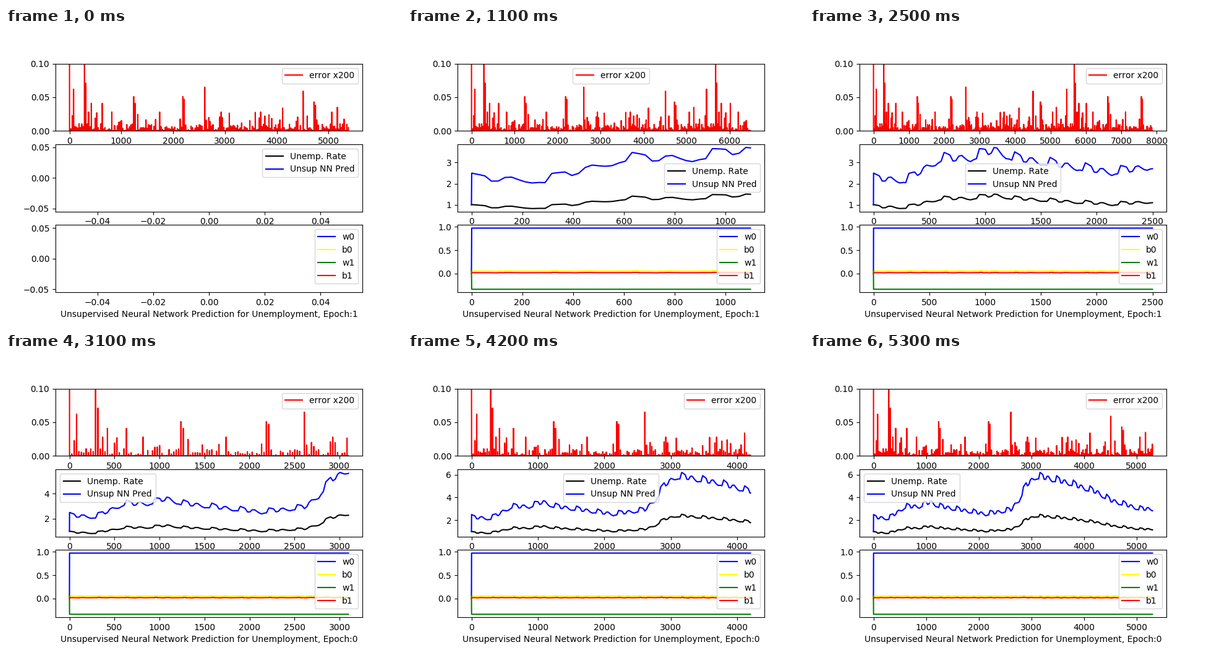
Write a matplotlib script that moves like this. It is 640 px wide and 480 px high and loops after 5.4 s.

```python
import numpy as np
import matplotlib.pyplot as plt
from matplotlib.animation import FuncAnimation

plt.rcParams["font.family"] = "DejaVu Sans"
plt.rcParams["text.kerning_factor"] = 6

FRAMES = 54
STEP = 100          # samples added per frame
TOTAL = 5382        # samples in one epoch
MONTH = 26.36       # samples per month
SWITCH = 28         # frames from here on show epoch 0
GAIN = 2.455        # prediction relative to the rate

# Key points (month, level) of the relative rate, and its yearly swing
TREND = [(0, .92), (11, .88), (23, 1.3), (33, 1.31), (41, 1.47), (47, 1.32),
         (81, 1.035), (99, 1.19), (105, 1.55), (110, 2.07), (117, 2.37),
         (123, 2.35), (141, 2.15), (161, 1.82), (171, 1.53), (192, 1.22)]
SEASON = np.array([1, .8, .55, -.45, -.4, .35, .45, 0, -.4, -.6, -.45, -.45])

# Months with the tallest error spikes
TALL = {0: .3, 3: .062, 11: .25, 12: .071, 16: .041, 24: .041, 47: .051,
        48: .041, 83: .051, 84: .047, 99: .065, 156: .034, 171: .059,
        179: .043, 180: .038, 196: .035}


def monthly_rate():
    m = np.arange(206)
    level = np.interp(m, *zip(*TREND))
    return level + SEASON[m % 12] * (.055 + .047 * level)


def error_series():
    rng = np.random.default_rng(4)
    err = np.zeros(TOTAL)
    for k in range(204):
        small = min(rng.exponential(.007), .028)
        err[round(k * MONTH)] = TALL.get(k, small)
    again = err.copy()
    again[0] = .005
    return np.concatenate([err, again])


def weight(start, settled):
    values = settled + np.zeros(TOTAL)
    values[0] = start
    return values


x = np.arange(2 * TOTAL)
months = monthly_rate()
rate = np.interp(x[:TOTAL] / MONTH, np.arange(len(months)), months)
pred = GAIN * rate
pred[0] = 1.0
pred[1:6] = 2.5
error = error_series()
change = np.diff(months, prepend=months[0])
wobble = .03 * change[(x[:TOTAL] / MONTH).astype(int)]

fig, (ax_err, ax_rate, ax_w) = plt.subplots(3, 1, figsize=(6.4, 4.8), dpi=100)


def add_lines(ax, *specs):
    lines = [ax.plot([], [], color=c, label=name, lw=1.5)[0]
             for name, c in specs]
    ax.legend(loc="best")
    return lines


err_line, = add_lines(ax_err, ("error x200", "red"))
lines = add_lines(ax_rate, ("Unemp. Rate", "black"), ("Unsup NN Pred", "blue"))
lines += add_lines(ax_w, ("w0", "blue"), ("b0", "yellow"),
                   ("w1", "green"), ("b1", "red"))
series = [rate, pred, weight(.07, .972), weight(.05, .055 + wobble),
          weight(.07, -.335), weight(0, .02 + wobble)]
ax_err.set_ylim(0, .1)


def update(i):
    n = i * STEP
    epoch = 1 if i < SWITCH else 0
    count = n + 1 + epoch * TOTAL
    err_line.set_data(x[:count], error[:count])
    for line, values in zip(lines, series):
        line.set_data(x[:n], values[:n])
    for ax in (ax_err, ax_rate, ax_w):
        ax.relim()
        ax.autoscale_view()
    ax_w.set_xlabel("Unsupervised Neural Network Prediction for "
                    f"Unemployment, Epoch:{epoch}")
    return [err_line, *lines]


anim = FuncAnimation(fig, update, frames=FRAMES, interval=100,
                     init_func=lambda: update(0), repeat=True, repeat_delay=0)
plt.show()
```
